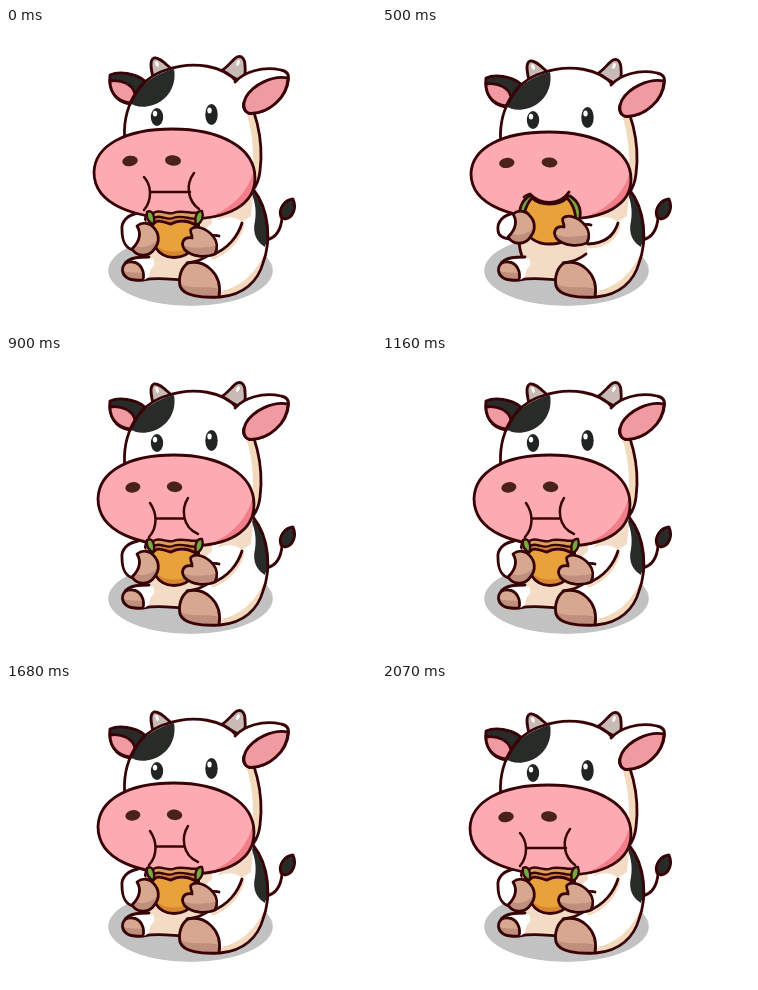
Write an HTML page that moves like this. It is 370 px wide and 300 px high and loops after 2970 ms.

```html
<!DOCTYPE html>
<html lang="en">
<head>
<meta charset="utf-8">
<title>Cow eating a sandwich</title>
<style>
html, body { margin: 0; width: 100%; height: 100%; overflow: hidden; background: #fff; }
svg { display: block; width: 370px; height: 300px; }
path { vector-effect: non-scaling-stroke; }
</style>
</head>
<body>
<svg id="stage" viewBox="0 0 370 300" stroke-linecap="round" stroke-linejoin="round"></svg>
<script>
const INK = '#380307', WHITE = '#fff', BEIGE = '#f2dcc6', TAN = '#f4dabd', BLACK = '#292b28',
  PINK = '#fbabb1', ROSE = '#f37e8b', EAR = '#f09aa1', HOOF = '#d6a88f', HOOF_SHADE = '#bd8f7c',
  HORN = '#c8bab5', BREAD = '#e9a23b', BREAD_SHADE = '#d9852f', CRUST = '#cf8143', GREEN = '#6fae3c';

const shape = (d, fill, stroke = INK, width = 2.8) =>
  `<path d="${d}" fill="${fill}" stroke="${stroke}" stroke-width="${width}"/>`;
const flat = (d, fill) => shape(d, fill, 'none');
const line = (d, width) => shape(d, 'none', INK, width);
const shaded = (d, fill, shadow, dark) => flat(d, fill) + flat(shadow, dark) + line(d);
const oval = (x, y, rx, ry, fill, turn = 0) =>
  `<ellipse cx="${x}" cy="${y}" rx="${rx}" ry="${ry}" fill="${fill}" transform="rotate(${turn} ${x} ${y})"/>`;
const move = (x, y, body) => `<g transform="translate(${x} ${y})">${body}</g>`;

const torso = 'M142 180C137 198 135 216 140 228L138 252C150 249 162 251 174 252L214 269C238 267 252 253 257 235C265 214 264 182 247 161Z';
const body = oval(184.5, 242.5, 82.3, 35.5, '#c3c2c3') +
  line('M260 212C270 210 275 201 276 190') +
  shape('M275 189C272 180 279 172 287 171C291 180 287 190 279 191Z', BLACK) +
  flat(torso, WHITE) +
  flat('M142 180C137 198 135 216 140 228L138 252C150 249 162 251 174 252L182 235C196 233 203 230 205 224L206 186Z', BEIGE) +
  flat('M212 190L238 170L247 168L245 188L236 194C229 188 220 188 212 192Z', BEIGE) +
  flat('M247 163C263 181 265 202 259 219C251 214 246 206 249 193C251 181 248 172 246 166Z', BLACK) +
  flat('M258 226C249 246 234 260 214 263V269C238 267 252 253 258 226Z', TAN) +
  line(torso) +
  flat('M120 234C126 229 134 229 142 229C149 230 150 236 146 240C142 243 146 249 138 252Z', WHITE) +
  line('M119 235C125 229 134 229 143 229') +
  shaded('M137 252C127 253 118 251 116.500 243C116 236 121 233 127 234C135 235 139 244 137 252Z', HOOF,
    'M117 242C122 246 130 243 138 246L137 252C127 253 118 251 117 242Z', HOOF_SHADE) +
  flat('M181 235C190 231 203 231 210 228L232 232L214 267Z', WHITE) +
  line('M181 235C190 234 198 231 204 226') +
  shaded('M213 269C196 270 177 268 174 258C172 248 176 239 182 235C199 231 217 246 213 269Z', HOOF,
    'M174 256C186 262 200 257 214 261L213 269C196 270 177 268 174 256Z', HOOF_SHADE);

const skull = 'M119 115C115 78 134 50 160 42C188 32 218 38 231 54C250 75 258 113 254 143C253 152 250 158 247 162L180 180Z';
const eye = (x, y, ry) => oval(x, y, 6.2, ry, '#202523') + oval(x - 2, y - ry * .38, 2.2, 2.9, WHITE);
const head =
  shape('M148 53C145 42 143 32 148 30C154 29 160 37 167 42Z', HORN) +
  shape('M215 43C222 39 226 32 231 29C236 27 239 31 239 38C240 45 239 49 236 54Z', HORN) +
  oval(151, 36, 1.6, 3, WHITE, -20) + oval(232, 35, 1.6, 3, WHITE, 20) +
  flat(skull, WHITE) +
  flat('M238 64C252 88 257 119 253 145L245 160C249 130 247 105 240 84Z', TAN) +
  flat('M168 41C171 57 162 72 147 77C138 80 129 79 124 75C130 60 147 46 168 41Z', BLACK) +
  line(skull) +
  shape('M139 53C129 45 113 43 104 47C102 61 109 74 124 76C128 68 132 60 139 53Z', BLACK) +
  shape('M104 53C116 51 127 57 129 66L124 75C111 74 104 64 104 53Z', EAR) +
  shape('M229 54C238 44 256 38 275 42C281 43 283 46 282.500 51C281 70 262 85 245 85.500C239 85 236 80 238 74', WHITE) +
  shape('M282 50C266 47 247 57 240 69C236 77 238 85 245 85.500C263 85 281 70 282 50Z', EAR) +
  eye(151, 89, 9) + eye(205.5, 86.5, 10.5);

const snout = 'M88 144C89 117 120 101 166 101C215 101 249 120 249 150C249 177 222 191 181 191C131 191 88 178 88 144Z';
const muzzle = ([left, top, right, bottom]) => {
  const sx = (right - left) / 161, sy = (bottom - top) / 90;
  return `<g transform="translate(${left} ${top}) scale(${sx} ${sy}) translate(-88 -101)">` +
    flat(snout, PINK) +
    flat('M248 141C243 163 227 180 202 189.500C230 185 253 169 248 141Z', ROSE) +
    line(snout) +
    oval(124, 133, 7.8, 5.2, '#4b211c', -8) + oval(167, 132.5, 8, 5.2, '#4b211c', 5) + '</g>';
};

const mouths = {
  wide: line('M138 149C146 158 146 172 138 182M144 164H184M188 145C179 157 182 173 193 181', 2.5),
  tight: line('M144 147C151 157 152 171 143 181M150 162.500H177M182 142C175 153 176 171 192 178', 2.5),
  open: shape('M154 167C156 160 181 160 184 167C182 175 157 175 154 167Z', '#c9383a'),
  bite: ''
};

const sandwiches = {
  bitten:
    shape('M146 186C153 180 160 187 167 185C177 181 186 187 194 184L192 205H148Z', '#e1a05a', INK, 2.4) +
    shape('M147 191C153 185 160 193 167 190C177 186 185 193 193 190L191 206H148Z', CRUST, INK, 2.4) +
    shape('M141 184C146 181 149 187 148 196C142 195 140 189 141 184Z', GREEN, INK, 2.4) +
    shape('M190 197C188 189 191 182 196 183C198 188 196 195 190 197Z', GREEN, INK, 2.4) +
    shaded('M146 198C151 189 159 195 165 196C173 191 184 193 191 198C195 212 186 229.500 168 229.500C151 229.500 142 212 146 198Z', BREAD,
      'M148 216C160 226 176 226 189 216C183 226 177 229.500 168 229.500C159 229.500 152 225 148 216Z', BREAD_SHADE),
  whole:
    shape('M138 197C137 181 152 172.500 167 172.500C183 172.500 198 181 197 197L190 204H145Z', GREEN) +
    shaded('M167 178C182 178 193 188 193 203C193 218 182 227 167 227C152 227 141 218 141 203C141 188 152 178 167 178Z', BREAD,
      'M144 214C158 225 177 225 190 214C185 223 177 227 167 227C157 227 149 223 144 214Z', BREAD_SHADE),
  mouthful:
    shape('M147 168C138 174 136 184 139 193H197C200 184 198 174 188 168Z', GREEN) +
    shape('M150 170C158 178 177 178 185 170C199 184 198 216 168 216C137 216 137 184 150 170Z', BREAD) +
    flat('M148 165C158 177 178 177 187 164L181 160H153Z', PINK) +
    line('M142 169C144 167 146 167 148 166C158 177 178 178 187 164')
};

const arms = (l, r) => {
  const lower = `M236 195C232 208 222 ${221 + r * .5} 206 ${227 + r}`;
  return shape(`M132 185C121 187 115 194 116 202C116 ${213 + l * .5} 120 ${221 + l * .9} 128 ${222 + l * .9}L145 200`, WHITE) +
    move(1, 3, shape(lower, 'none', TAN, 3)) +
    flat(`M200 ${200 + r}C212 190 228 186 236 195C232 208 222 ${221 + r * .5} 206 ${227 + r}Z`, WHITE) +
    line(lower);
};

const leftHoof = shaded('M131 198C136 194 144 194 148 200C153 205 154 214 149 220C144 229 132 230 126 221C133 214 136 206 131 198Z', HOOF,
  'M129 217C136 221 144 219 152 212C152 226 134 232 126 221Z', HOOF_SHADE);
const rightHoof = line('M203 208C208 207 211 207 213 208') +
  shaded('M207 208C200 200 190 197 185 201C183 205 187 207 186 210C177 208 174 216 179 222C186 229 200 230 209 226C212 220 211 213 207 208Z', HOOF,
    'M177 217C187 222 199 219 211 218L209 226C200 230 183 230 177 217Z', HOOF_SHADE);

const WIDE_BOX = [88, 101, 249, 191], TALL_BOX = [92, 99, 248, 190], LOW_BOX = [89, 104, 249, 191];
const pose = (lift, box, mouth, food, foodY = 0, left = [0, 0], right = [0, 0]) =>
  body + arms(left[1], right[1]) + move(0, lift, head) + muzzle(box) + mouths[mouth] +
  move(0, foodY, sandwiches[food]) + move(...left, leftHoof) + move(...right, rightHoof);

const wide = pose(0, WIDE_BOX, 'wide', 'bitten');
const tight = pose(-2, TALL_BOX, 'tight', 'bitten');
const ready = pose(-1, [90, 100, 249, 191], 'open', 'whole', 2, [0, -3], [0, -1]);
const open = pose(-2, TALL_BOX, 'open', 'whole', 0, [0, -6], [0, -3]);
const raise = pose(-2, TALL_BOX, 'open', 'whole', -3, [0, -9], [-2, -6]);
const nibble = pose(1, [89, 102, 249, 191], 'bite', 'mouthful', 0, [0, -12], [-3, -9]);
const bite = pose(3, LOW_BOX, 'bite', 'mouthful', 0, [0, -12], [-4, -11]);

const LOOP = 2970;
const poses = [wide, ready, open, raise, nibble, bite, wide, tight, wide];
// 100 ms steps for the bite, then 130 ms chewing until the final hold.
function poseAt(t) {
  if (t < 900) return poses[Math.floor(t / 100)];
  const chew = Math.min(9, Math.floor((t - 900) / 130));
  return chew % 2 ? wide : tight;
}

const stage = document.getElementById('stage');
const start = performance.now();
let shown;
function draw(now) {
  const next = poseAt(Math.max(0, now - start) % LOOP);
  if (next !== shown) stage.innerHTML = shown = next;
  requestAnimationFrame(draw);
}
draw(start);
</script>
</body>
</html>
```
